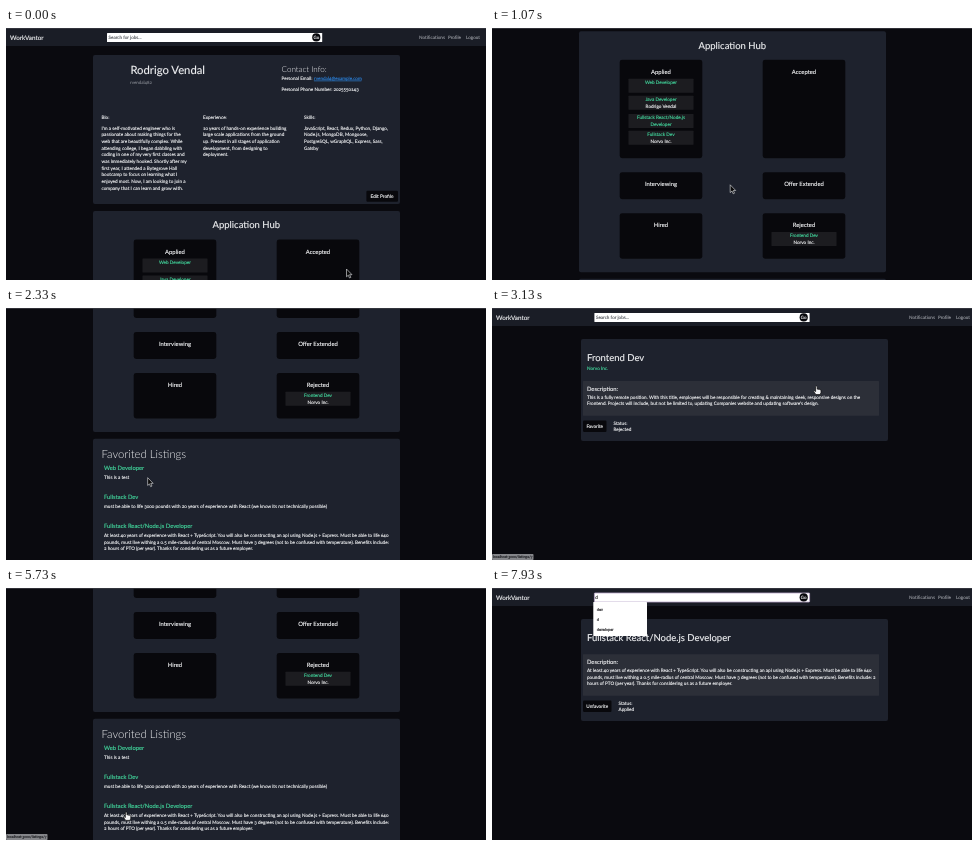
Write an HTML page that moves like this. It is 480 px wide and 252 px high and loops after 8 s.

```html
<!DOCTYPE html>
<html lang="en">
<head>
<meta charset="utf-8">
<title>Job board walkthrough</title>
<style>
  html, body { margin: 0; width: 100%; height: 100%; overflow: hidden; background: #0a0a0f; }
  svg { display: block; width: 480px; height: 252px; }
  text {
    font-family: Lato, "Open Sans", sans-serif; font-variant-numeric: oldstyle-nums;
    text-rendering: geometricPrecision; white-space: pre; stroke-width: 0.14px;
  }
  .ui { font-family: Roboto, "Liberation Sans", sans-serif; }
  .thin { font-weight: 300; stroke-width: 0; }
</style>
</head>
<body>
<svg id="stage" viewBox="0 0 480 252" xmlns="http://www.w3.org/2000/svg"></svg>
<script>
const NS = 'http://www.w3.org/2000/svg';
const stage = document.getElementById('stage');
const LOOP = 8000, FPS = 15;
const WHITE = '#f1f2f4', GREEN = '#42d69c', CARD = '#1e222d', BLACK = '#08080c';
const BODY = 4.66, LINE = 6.67;

function add(parent, tag, attrs = {}) {
  const el = document.createElementNS(NS, tag);
  for (const k in attrs) el.setAttribute(k, attrs[k]);
  parent.appendChild(el);
  return el;
}
const group = parent => add(parent, 'g');
const box = (p, x1, y1, x2, y2, fill, rx = 0) =>
  add(p, 'rect', { x: x1, y: y1, width: x2 - x1, height: y2 - y1, fill, rx });

// y is the middle of the capitals; a hairline stroke adds a little weight
function label(p, str, x, y, size = BODY, opts = {}) {
  const fill = opts.fill || WHITE;
  const el = add(p, 'text', { x, y: y + size * 0.36, 'font-size': size, ...opts, fill, stroke: fill });
  el.textContent = str;
  return el;
}
const centred = (p, str, x, y, size = BODY, fill = WHITE) =>
  label(p, str, x, y, size, { fill, 'text-anchor': 'middle' });
const lines = (p, rows, x, y) => rows.forEach((s, i) => label(p, s, x, y + i * LINE));
const show = (el, on) => el.setAttribute('visibility', on ? 'inherit' : 'hidden');

function nav(p, inputDx, linksDx) {
  box(p, 0, 0, 480, 18, '#1a1d26');
  label(p, 'WorkVantor', 4, 9.3, 6.3);
  const field = group(p);
  field.setAttribute('transform', `translate(${inputDx} 0)`);
  const input = box(field, 101, 5, 316.2, 14, '#fff', 0.6);
  const hint = label(field, 'Search for jobs...', 102.5, 9.5, 4.6, { fill: '#55585e' });
  add(field, 'circle', { cx: 310.3, cy: 9.4, r: 4.1, fill: BLACK });
  centred(field, 'Go', 310.3, 9.4, 4.4);
  [['Notifications', 413], ['Profile', 442], ['Logout', 460]].forEach(([s, x]) =>
    label(p, s, x + linksDx, 9.3, 4.6, { fill: '#92959c' }));
  return { input, hint };
}

const ENGINEER = [
  'At least 40 years of experience with React + TypeScript. You will also be constructing an api using Node.js + Express. Must be able to life 640',
  'pounds, must live withing a 0.5 mile-radius of central Moscow. Must have 3 degrees (not to be confused with temperature). Benefits include:',
  '2 hours of PTO (per year). Thanks for considering us as a future employer.'
];

function profilePage() {
  const p = group(stage);
  nav(p, 0, 0);

  box(p, 87, 27, 394, 176, CARD, 2);
  label(p, 'Rodrigo Vendal', 124.4, 42.2, 11.3);
  label(p, 'rvendal482', 124, 54.3, 4.5, { fill: '#777b83' });
  label(p, 'Contact Info:', 275.5, 40.6, 8.1, { class: 'thin' });
  label(p, 'Personal Email:', 275.5, 50);
  label(p, 'rvendal4@example.com', 308, 50, 4.6, { fill: '#2b7fd6', 'text-decoration': 'underline' });
  label(p, 'Personal Phone Number: 2025550143', 275.5, 61.3);

  label(p, 'Bio:', 95.5, 89);
  lines(p, [
    "I'm a self-motivated engineer who is",
    'passionate about making things for the',
    'web that are beautifully complex. While',
    'attending college, I began dabbling with',
    'coding in one of my very first classes and',
    'was immediately hooked. Shortly after my',
    'first year, I attended a Bytegrove Hall',
    'bootcamp to focus on learning what I',
    'enjoyed most. Now, I am looking to join a',
    'company that I can learn and grow with.'
  ], 95.5, 100);
  label(p, 'Experience:', 197, 89);
  lines(p, [
    '10 years of hands-on experience building',
    'large scale applications from the ground',
    'up. Present in all stages of application',
    'development, from designing to',
    'deployment.'
  ], 197, 100);
  label(p, 'Skills:', 298, 89);
  lines(p, [
    'JavaScript, React, Redux, Python, Django,',
    'Node.js, MongoDB, Mongoose,',
    'PostgreSQL, wGraphQL, Express, Sass,',
    'Gatsby'
  ], 298, 100);
  box(p, 360.4, 162.7, 392, 173.7, BLACK, 1.2);
  centred(p, 'Edit Profile', 376, 168.2, 4.8);

  box(p, 87, 183, 394, 424, CARD, 2);
  centred(p, 'Application Hub', 240.3, 197, 9.5);
  const column = (title, x, top, bottom) => {
    box(p, x - 41.3, top, x + 41.3, bottom, BLACK, 2.4);
    centred(p, title, x, top + 12.2, 5.9);
  };
  column('Applied', 169, 211.5, 310);
  column('Accepted', 312, 211.5, 310);
  column('Interviewing', 169, 324, 351);
  column('Offer Extended', 312, 324, 351);
  column('Hired', 169, 365, 410.5);
  column('Rejected', 312, 365, 410.5);

  const item = (x, y, title, sub, subFill) => {
    box(p, x - 32.5, y, x + 32.5, y + 14, '#1c1c20', 0.5);
    centred(p, title, x, y + 3.6, BODY, GREEN);
    centred(p, sub, x, y + 10.2, BODY, subFill);
  };
  item(169, 230.5, 'Web Developer', '');
  item(169, 247.6, 'Java Developer', 'Rodrigo Vendal');
  item(169, 265.8, 'Fullstack React/Node.js', 'Developer', GREEN);
  item(169, 282.7, 'Fullstack Dev', 'Norvo Inc.');
  item(312, 383.8, 'Frontend Dev', 'Norvo Inc.');

  box(p, 87, 430.7, 394, 570, CARD, 2);
  label(p, 'Favorited Listings', 95.5, 446, 11.3, { class: 'thin' });
  const listing = (y, title, rows) => {
    label(p, title, 98, y, 5.85, { fill: GREEN });
    lines(p, rows, 98, y + 9);
  };
  listing(460.3, 'Web Developer', ['This is a test']);
  listing(489.3, 'Fullstack Dev',
    ['must be able to life 3000 pounds with 20 years of experience with React (we know its not technically possible)']);
  listing(518.3, 'Fullstack React/Node.js Developer', ENGINEER);
  return p;
}

function jobPage(job) {
  const p = group(stage);
  const { input, hint } = nav(p, 1.4, 4);
  box(p, 89, 31, 396, 133, CARD, 2);
  label(p, job.title, 95, 49.6, 9.5);
  label(p, job.company, 95, 60.3, BODY, { fill: GREEN });
  box(p, 91, job.top, 387, 107.7, '#2c2f38', 0.5);
  label(p, 'Description:', 95, job.top + 7.6, 5.8);
  lines(p, job.rows, 95, job.top + 16);
  box(p, 91, 112.6, job.edge, 124, BLACK, 1.2);
  centred(p, job.button, (91 + job.edge) / 2, 118.4, 4.7);
  label(p, 'Status:', job.edge + 7, 115);
  label(p, job.status, job.edge + 7, 121.7);
  return { page: p, input, hint };
}

const profile = profilePage();
const frontend = jobPage({
  title: 'Frontend Dev', company: 'Norvo Inc.', top: 73, edge: 114.5,
  button: 'Favorite', status: 'Rejected',
  rows: [
    'This is a fully remote position. With this title, employees will be responsible for creating & maintaining sleek, responsive designs on the',
    "Frontend. Projects will include, but not be limited to, updating Companies website and updating software's design."
  ]
});
const fullstack = jobPage({
  title: 'Fullstack React/Node.js Developer', company: '', top: 66.3, edge: 119.5,
  button: 'Unfavorite', status: 'Applied',
  rows: [ENGINEER[0], ENGINEER[1] + ' 2', ENGINEER[2].slice(2)]
});

const menu = group(fullstack.page);
box(menu, 101.3, 14, 155, 48, '#fff', 0.6);
['dev', 'd', 'developer'].forEach((s, i) =>
  label(menu, s, 104.7, 21.2 + i * 10, 3.9, { fill: '#16161a', class: 'ui' }));
const typed = label(fullstack.page, 'd', 103.3, 9.4, 4.7, { fill: '#222' });

const status = group(stage);
box(status, 0, 246, 41.5, 252, '#85868a', 0.8);
label(status, 'localhost:3000/listings/7', 1, 249.2, 3.55, { fill: '#1d1e22', class: 'ui' });
box(stage, 0, 0, 480, 0.8, '#393a42');

// pointers have their hot spot at 0,0
const pointer = group(stage);
const shapes = {
  arrow: add(pointer, 'path', {
    d: 'M0 0V7.8L1.8 6.2 3 9 4.3 8.4 3.1 5.7H5.5Z',
    fill: '#0a0a0a', stroke: '#d9dade', 'stroke-width': 0.65, 'stroke-linejoin': 'round'
  }),
  hand: add(pointer, 'path', {
    d: 'M-.8 .6Q0-.4.8.6V3.2Q1.6 2.6 2.2 3.4 3 2.9 3.5 3.7 4.5 3.5 4.6 4.6V6.4L3.8 8.6H-.5L-2.8 5.4Q-2.6 4.2-.8 5.6Z',
    fill: '#f4f4f6', stroke: '#0a0a0a', 'stroke-width': 0.7, 'stroke-linejoin': 'round'
  }),
  beam: add(pointer, 'path', {
    d: 'M-1.4 0Q0 0 0 1V7Q0 8-1.4 8M1.4 0Q0 0 0 1V7Q0 8 1.4 8',
    fill: 'none', stroke: '#9a9ba0', 'stroke-width': 0.7
  })
};

// [ms, value...]
const SCROLL = [
  [733, 0], [800, 10], [867, 52], [933, 105], [1000, 150], [1067, 180], [1133, 195],
  [1400, 195], [1467, 212], [1533, 256], [1600, 281], [1667, 294], [1733, 300]
];
const PATH = [
  [0, 340.5, 241], [267, 285, 195], [533, 238.2, 156.8],
  [1867, 238.2, 156.8], [2200, 105, 199], [2400, 160, 155], [2733, 332, 62],
  [2933, 324.4, 78], [3267, 324.4, 78], [3733, 180, 150],
  [3800, 180, 150], [4200, 165, 178], [4533, 123, 160], [4667, 103.5, 168.5],
  [4800, 103.5, 168.5], [5000, 112, 160], [5333, 126, 190], [5667, 120.2, 223.8],
  [6533, 120.2, 223.8], [6933, 176, 110], [7400, 150, 9.5], [7733, 176.5, 69.5]
];
const HAND = [[2860, 3330], [4460, 4600], [4930, 5060], [5600, 6600]];
const BEAM = [[4730, 4860], [7330, 7460]];
const STATUS = [[2930, 3400], [5600, 6660]];

const during = (spans, t) => spans.some(([a, b]) => t >= a && t < b);

function sample(keys, t) {
  const i = keys.findIndex(k => k[0] > t);
  if (i === 0) return keys[0].slice(1);
  if (i < 0) return keys[keys.length - 1].slice(1);
  const a = keys[i - 1], b = keys[i], f = (t - a[0]) / (b[0] - a[0]);
  return a.slice(1).map((v, j) => v + (b[j + 1] - v) * f);
}

function draw(now) {
  const t = Math.floor((now + 5) * FPS / 1000) * 1000 / FPS;
  const onFrontend = t >= 3130 && t < 3865;
  const onFullstack = t >= 5930;
  show(profile, !onFrontend && !onFullstack);
  show(frontend.page, onFrontend);
  show(fullstack.page, onFullstack);
  profile.setAttribute('transform', `translate(0 ${-sample(SCROLL, t)[0]})`);

  const focused = t >= 7395, typing = t >= 7930;
  fullstack.input.setAttribute('stroke', focused ? '#b9a6c9' : 'none');
  fullstack.input.setAttribute('stroke-width', 0.8);
  show(menu, t >= 7595);
  show(typed, typing);
  show(fullstack.hint, !typing);
  show(status, during(STATUS, t));

  const [x, y] = sample(PATH, t);
  const kind = during(HAND, t) ? 'hand' : during(BEAM, t) ? 'beam' : 'arrow';
  pointer.setAttribute('transform', `translate(${x} ${y})`);
  show(pointer, !typing);
  for (const k in shapes) shapes[k].setAttribute('display', k === kind ? 'inline' : 'none');
}

const start = performance.now();
function tick() {
  draw((performance.now() - start) % LOOP);
  requestAnimationFrame(tick);
}
tick();
</script>
</body>
</html>
```
